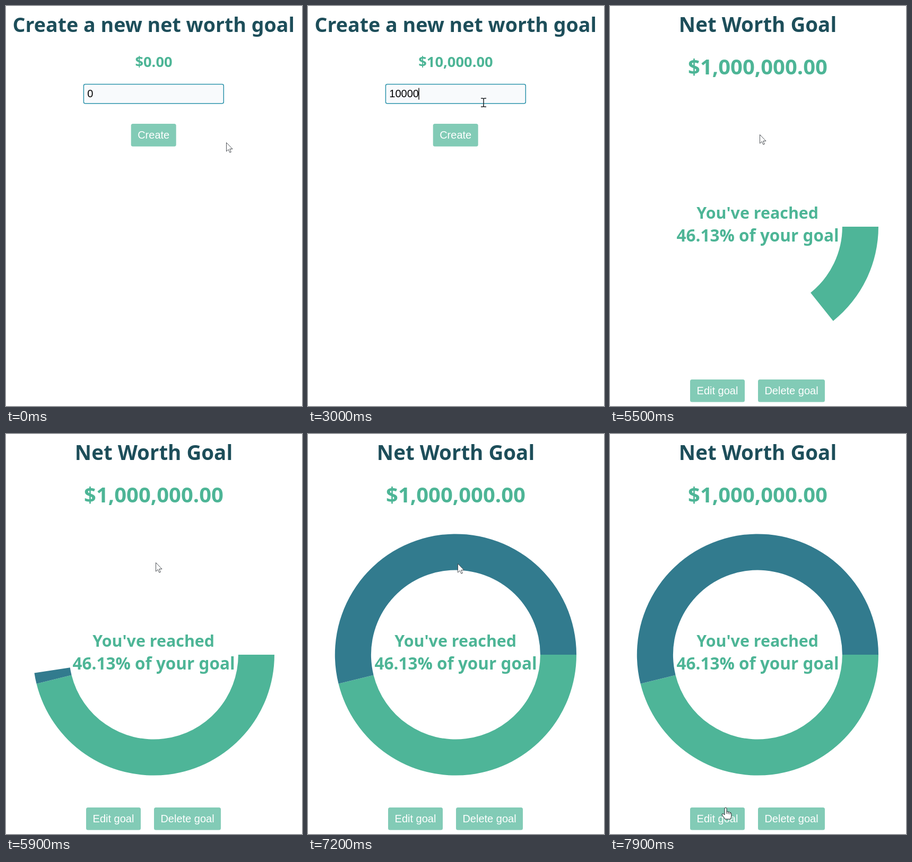
An HTML page that plays this animation: 558 by 754 pixels, repeating every 8 s.

```html
<!DOCTYPE html>
<html lang="en">
<head>
<meta charset="utf-8">
<title>Net worth goal</title>
<style>
  html, body { margin: 0; width: 100%; height: 100%; overflow: hidden; background: #fff; }
  svg { display: block; width: 558px; height: 754px; }
  .head { font-family: "Noto Sans", "Open Sans", sans-serif; font-weight: 700; text-anchor: middle; fill: #4db596; }
  .title { fill: #1d4e5a; }
  .ui { font: 20px "Liberation Sans", Arial, sans-serif; }
  .btn rect { fill: #4eb598; fill-opacity: .7; }
  .btn text { fill: #fff; text-anchor: middle; }
  #cursor path { stroke: #1c2226; stroke-linejoin: round; fill: #fff; }
  #cursor .arrow { stroke: #3c4046; stroke-width: .9; }
  #cursor .beam { fill: none; stroke-width: 1.5; }
</style>
</head>
<body>
<svg viewBox="0 0 558 754">
  <g id="form">
    <text class="head title" x="278.3" y="49" font-size="37.6">Create a new net worth goal</text>
    <text id="amount" class="head" x="278.5" y="115" font-size="27.3"></text>
    <rect x="146.4" y="147.6" width="263.9" height="36.2" rx="3" fill="#f8fafc" stroke="#2d93ab" stroke-width="1.5"/>
    <text id="value" class="ui" x="153.3" y="172"></text>
    <rect id="caret" y="154.5" width="1.4" height="22"/>
    <g class="btn ui">
      <rect id="create" x="235.7" y="222" width="85" height="42.7" rx="3.5"/>
      <text x="278.2" y="250">Create</text>
    </g>
  </g>
  <g id="goal">
    <text class="head title" x="278.5" y="49" font-size="38.5">Net Worth Goal</text>
    <text class="head" x="278.5" y="129" font-size="40">$1,000,000.00</text>
    <path id="done" fill="#4eb598"/>
    <path id="left" fill="#327b8e"/>
    <text class="head" x="278.2" y="401" font-size="30.4">You've reached</text>
    <text class="head" x="278.5" y="444" font-size="31.5">46.13% of your goal</text>
    <g class="btn ui">
      <rect x="151" y="704" width="103" height="42.5" rx="3.5"/>
      <text x="202.5" y="732">Edit goal</text>
      <rect x="279" y="704" width="126" height="42.5" rx="3.5"/>
      <text x="342" y="732">Delete goal</text>
    </g>
  </g>
  <g id="cursor">
    <path class="arrow" d="M.5 .5V17L4.3 13.5L6.9 19.2L9.3 18.2L6.8 12.5H12Z"/>
    <path class="beam" d="M-5 -8H-2Q0 -8 0 -6Q0 -8 2 -8H5M0 -6V6M-5 8H-2Q0 8 0 6Q0 8 2 8H5"/>
    <path class="hand" d="M-2 1.5Q0 -1 2 1.5V8Q4 6.8 5 8.5Q7 7.5 8 9.5Q10.5 9 10.8 12V16Q10.5 19 9 22H-1Q-3 18.5 -7 14Q-7 11 -4.5 11.8L-2 14ZM2 8V12M5 8.5V12.5M8 9.5V13"/>
  </g>
</svg>
<script>
const LOOP = 8000, PAGE = 5300;
const SWEEP = { start: 5330, time: 1200 };
const DONUT = { x: 278.4, y: 416, outer: 227.6, inner: 159.5, share: .4613 };
const DIGIT = 11.12;

// time, typed value
const typing = [[0, 0], [1500, 1], [2000, 10], [2200, 100], [2600, 1000],
  [3000, 10000], [3200, 100000], [3600, 1000000]];
// caret on, caret off
const blinks = [[200, 700], [1500, 4100], [4600, 5100]];
// time, x, y
const track = [[0, 415, 257], [100, 415, 257], [500, 331, 182], [3650, 331, 182],
  [4100, 324, 228], [4450, 324, 228], [4750, 291, 239], [5100, 291, 239],
  [5400, 282, 242], [6300, 282, 242], [6500, 282, 244], [7200, 282, 244], [7850, 218, 704]];

const $ = id => document.getElementById(id);
const clamp = v => Math.min(1, Math.max(0, v));
const ease = v => v * v * (3 - 2 * v);
const show = (el, on) => el.setAttribute('visibility', on ? 'inherit' : 'hidden');
const inside = (x, y, l, t, r, b) => x >= l && x <= r && y >= t && y <= b;

function pointer(t) {
  const i = track.findLastIndex(p => p[0] <= t);
  const a = track[i], b = track[i + 1] || a;
  const k = a === b ? 0 : ease((t - a[0]) / (b[0] - a[0]));
  return [a[1] + (b[1] - a[1]) * k, a[2] + (b[2] - a[2]) * k];
}

function kind(x, y, onForm) {
  if (onForm) {
    if (inside(x, y, 146, 147, 411, 185)) return 'beam';
    return inside(x, y, 236, 222, 321, 265) ? 'hand' : 'arrow';
  }
  return inside(x, y, 151, 703, 254, 747) ? 'hand' : 'arrow';
}

// ring sector, angles as shares of a turn, clockwise from the right
function sector(from, to) {
  if (to <= from) return '';
  const at = (r, s) => {
    const a = s * 2 * Math.PI;
    return `${DONUT.x + r * Math.cos(a)} ${DONUT.y + r * Math.sin(a)}`;
  };
  const { outer: R, inner: r } = DONUT, big = +(to - from > .5);
  return `M${at(R, from)}A${R} ${R} 0 ${big} 1 ${at(R, to)}` +
    `L${at(r, to)}A${r} ${r} 0 ${big} 0 ${at(r, from)}Z`;
}

function drawForm(t) {
  const value = typing.findLast(s => s[0] <= t)[1];
  $('value').textContent = value;
  $('amount').textContent = '$' + value.toLocaleString('en-US') + '.00';
  $('caret').setAttribute('x', 152.7 + DIGIT * String(value).length);
  show($('caret'), blinks.some(([on, off]) => t >= on && t < off));
  $('create').style.fillOpacity = .7 + .3 * clamp((t - 4650) / 300);
}

function drawGoal(t) {
  const sweep = clamp((t - SWEEP.start) / SWEEP.time);
  $('done').setAttribute('d', sector(0, Math.min(sweep, DONUT.share)));
  $('left').setAttribute('d', sector(DONUT.share, sweep));
}

function draw(t) {
  const onForm = t < PAGE;
  show($('form'), onForm);
  show($('goal'), !onForm);
  (onForm ? drawForm : drawGoal)(t);
  const [x, y] = pointer(t), type = kind(x, y, onForm);
  $('cursor').setAttribute('transform', `translate(${x} ${y})`);
  for (const el of $('cursor').children) show(el, el.classList.contains(type));
}

const begin = performance.now();
function tick() {
  draw((performance.now() - begin) % LOOP);
  requestAnimationFrame(tick);
}
tick();
</script>
</body>
</html>
```
